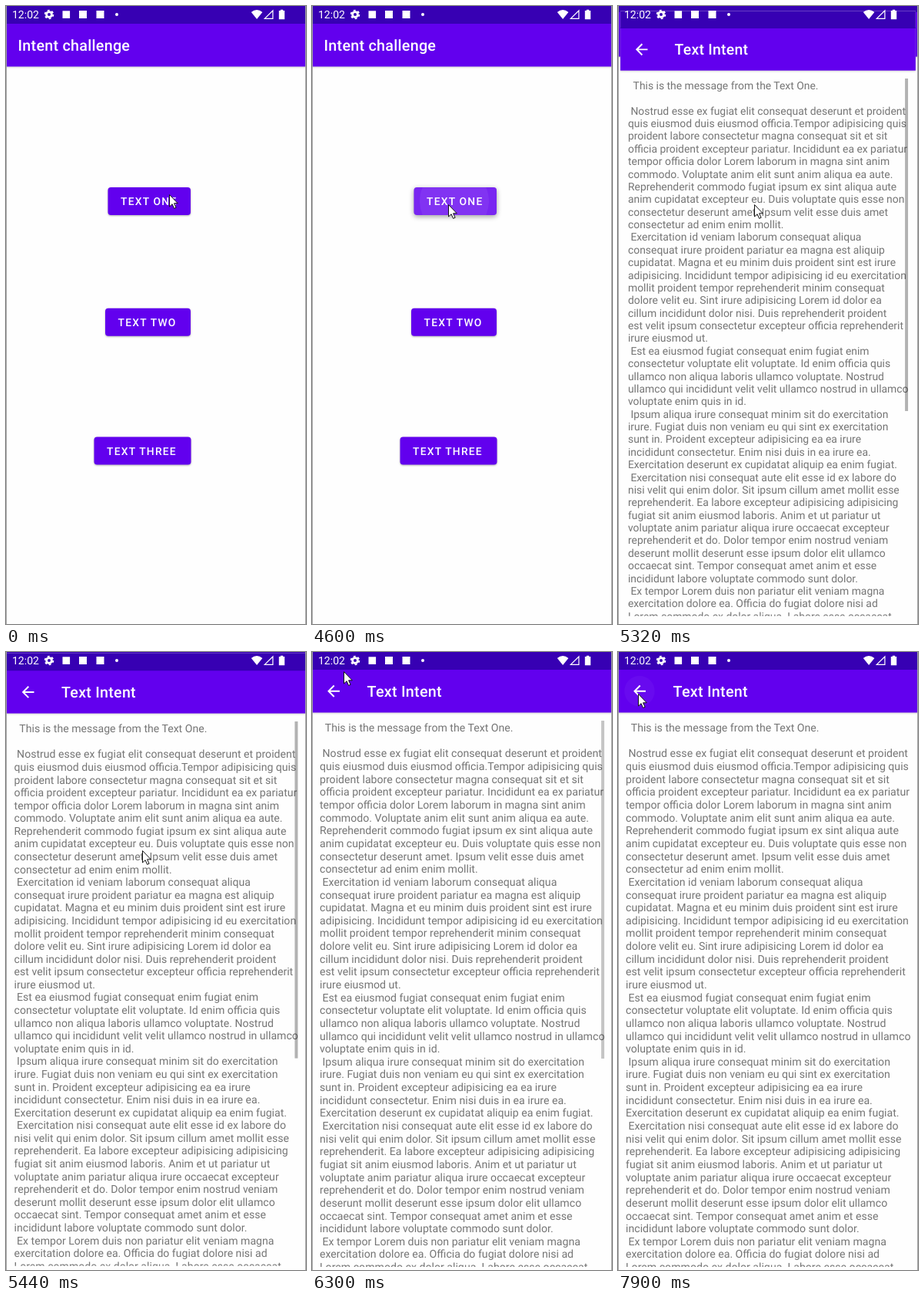
An HTML page for the animation above (8000 ms loop, 390 px wide and 801 px high).

```html
<!DOCTYPE html>
<html lang="en">
<head>
<meta charset="utf-8">
<title>Intent challenge</title>
<style>
html, body { margin: 0; width: 100%; height: 100%; overflow: hidden; background: #fefefe; }
svg { display: block; width: 390px; height: 801px; }
text { font-family: Roboto, "Noto Sans", sans-serif; white-space: pre; text-rendering: geometricPrecision; }
.title { font-size: 19.76px; font-weight: 500; letter-spacing: .25px; fill: #fff; }
.label { font-size: 13.83px; font-weight: 500; letter-spacing: 1.235px; fill: #fff; }
.body { font-size: 14.13px; fill: #757575; }
.clock { font-size: 14px; fill: #fff; }
.btn { fill: #6200ee; filter: drop-shadow(0 1px 1px rgba(0,0,0,.3)); }
.btn.down { filter: drop-shadow(0 2px 3px rgba(0,0,0,.38)); }
.bar { fill: #6200ee; filter: drop-shadow(0 1px 1px rgba(0,0,0,.18)); }
</style>
</head>
<body>
<svg viewBox="0 0 390 801">
  <defs>
    <clipPath id="btnClip"><rect x="132.5" y="235" width="107.5" height="36" rx="4"/></clipPath>
    <clipPath id="textClip"><rect x="0" y="86" width="390" height="711"/></clipPath>
  </defs>

  <g id="home">
    <rect width="390" height="801" fill="#fefefe"/>
    <rect class="bar" y="22" width="390" height="56.5"/>
    <rect width="390" height="23" fill="#3700b3"/>
    <text class="title" x="15.5" y="58">Intent challenge</text>
    <g id="buttons"></g>
  </g>

  <g id="detail">
    <rect width="390" height="801" fill="#fefefe"/>
    <rect class="bar" y="22" width="390" height="56.5"/>
    <rect width="390" height="23" fill="#3700b3"/>
    <circle id="ripple" cx="28" cy="50.7" r="19.7" fill="#fff" opacity="0"/>
    <path transform="translate(16.2 38.9) scale(.988)" fill="#fff"
      d="M20 11H7.83l5.59-5.59L12 4l-8 8 8 8 1.41-1.41L7.83 13H20z"/>
    <text class="title" x="71.6" y="58">Text Intent</text>
    <g id="lines" clip-path="url(#textClip)"></g>
    <rect id="thumb" x="376" y="89" width="4" height="438" fill-opacity=".3"/>
  </g>

  <g id="status" fill="#fff">
    <text class="clock" x="8" y="16">12:02</text>
    <circle cx="56" cy="11" r="3.4" fill="none" stroke="#fff" stroke-width="2.8"/>
    <circle cx="56" cy="11" r="5.4" fill="none" stroke="#fff" stroke-width="1.8" stroke-dasharray="2.8 2.855"/>
    <rect x="73.5" y="6.3" width="9.6" height="9.6"/>
    <rect x="95" y="6" width="10" height="10"/>
    <rect x="117.5" y="6" width="10" height="10"/>
    <circle cx="144" cy="11" r="2"/>
    <path d="M318.8 8Q326 2.2 333.4 8L326.1 17Z"/>
    <path d="M346.9 6V16.4H336.3Z" fill="none" stroke="#fff" stroke-width="1.2"/>
    <path d="M354.8 6h2V4.700h3.400V6h2v11.200h-7.400z"/>
  </g>

  <path id="cursor" d="M.5.6V16l3.600-3.300 2.500 5.700 2.500-1.100-2.500-5.500h4.700z"
    fill="#fff" stroke="#111" stroke-width="1" stroke-linejoin="round"/>
  <path d="M.5 0V801M389.5 0V801" stroke="#a2a2a2"/>
</svg>

<script>
const LOOP = 8000;
const $ = id => document.getElementById(id);

function add(parent, tag, attrs, text) {
  const el = document.createElementNS("http://www.w3.org/2000/svg", tag);
  for (const k in attrs) el.setAttribute(k, attrs[k]);
  if (text) el.textContent = text;
  return parent.appendChild(el);
}

const buttons = [
  ["TEXT ONE", 132.5, 235, 107.5],
  ["TEXT TWO", 129, 391.7, 111],
  ["TEXT THREE", 114.5, 558.6, 126],
];
let press, firstBtn;
buttons.forEach(([name, x, y, width], i) => {
  const box = add($("buttons"), "rect", { class: "btn", x, y, width, height: 36, rx: 4 });
  if (!i) {
    firstBtn = box;
    press = add($("buttons"), "g", { "clip-path": "url(#btnClip)", fill: "#fff" });
    add(press, "rect", { x, y, width, height: 36, opacity: .15 });
    add(press, "circle", { cx: 185, cy: 253, r: 45, opacity: .06 });
  }
  add($("buttons"), "text", { class: "label", x: x + 16.5, y: y + 23.3 }, name);
});

const copy = `  This is the message from the Text One.

 Nostrud esse ex fugiat elit consequat deserunt et proident
quis eiusmod duis eiusmod officia.Tempor adipisicing quis
proident labore consectetur magna consequat sit et sit
officia proident excepteur pariatur. Incididunt ea ex pariatur
tempor officia dolor Lorem laborum in magna sint anim
commodo. Voluptate anim elit sunt anim aliqua ea aute.
Reprehenderit commodo fugiat ipsum ex sint aliqua aute
anim cupidatat excepteur eu. Duis voluptate quis esse non
consectetur deserunt amet. Ipsum velit esse duis amet
consectetur ad enim enim mollit.
 Exercitation id veniam laborum consequat aliqua
consequat irure proident pariatur ea magna est aliquip
cupidatat. Magna et eu minim duis proident sint est irure
adipisicing. Incididunt tempor adipisicing id eu exercitation
mollit proident tempor reprehenderit minim consequat
dolore velit eu. Sint irure adipisicing Lorem id dolor ea
cillum incididunt dolor nisi. Duis reprehenderit proident
est velit ipsum consectetur excepteur officia reprehenderit
irure eiusmod ut.
 Est ea eiusmod fugiat consequat enim fugiat enim
consectetur voluptate elit voluptate. Id enim officia quis
ullamco non aliqua laboris ullamco voluptate. Nostrud
ullamco qui incididunt velit velit ullamco nostrud in ullamco
voluptate enim quis in id.
 Ipsum aliqua irure consequat minim sit do exercitation
irure. Fugiat duis non veniam eu qui sint ex exercitation
sunt in. Proident excepteur adipisicing ea ea irure
incididunt consectetur. Enim nisi duis in ea irure ea.
Exercitation deserunt ex cupidatat aliquip ea enim fugiat.
 Exercitation nisi consequat aute elit esse id ex labore do
nisi velit qui enim dolor. Sit ipsum cillum amet mollit esse
reprehenderit. Ea labore excepteur adipisicing adipisicing
fugiat sit anim eiusmod laboris. Anim et ut pariatur ut
voluptate anim pariatur aliqua irure occaecat excepteur
reprehenderit et do. Dolor tempor enim nostrud veniam
deserunt mollit deserunt esse ipsum dolor elit ullamco
occaecat sint. Tempor consequat amet anim et esse
incididunt labore voluptate commodo sunt dolor.
 Ex tempor Lorem duis non pariatur elit veniam magna
exercitation dolore ea. Officia do fugiat dolore nisi ad
Lorem commodo ex dolor aliqua. Labore esse occaecat`;
copy.split("\n").forEach((line, i) =>
  add($("lines"), "text", { class: "body", x: 10, y: (103.2 + i * 16.64).toFixed(2) }, line));

// Each row: start time, then the values held until the next row
const cursorSteps = [
  [0, 212, 244], [500, 205, 247], [620, 187, 256], [740, 171, 263],
  [990, 163, 260], [1110, 161, 257], [1260, 169, 257], [1380, 177, 257],
  [5810, 108, 128], [5930, 44, 19],
  [6300, 41, 25], [6420, 35, 38], [6540, 29, 50], [6660, 27, 54], [6800, 26, 54],
];
const pressSteps = [[0, 0], [4600, 1], [4960, 0]];
// home scale, detail scale, detail opacity
const openSteps = [
  [0, 1, .85, 0], [5200, 1.002, .855, 0], [5320, 1.04, .984, 1],
  [5440, 1.045, .9967, 1], [5560, 1.045, 1, 1],
];
const thumbSteps = [[0, 1], [6300, .75], [6420, .4], [6540, .1], [6660, 0]];
const rippleSteps = [[0, 0], [7300, .08], [7420, .14], [7660, .13], [7900, .04]];

function at(steps, t) {
  let row = steps[0];
  for (const s of steps) if (s[0] <= t) row = s;
  return row.slice(1);
}

const zoom = (el, s) =>
  el.setAttribute("transform", `translate(195 400.5) scale(${s}) translate(-195 -400.5)`);
const fade = (el, a) => el.setAttribute("opacity", a);

function draw(t) {
  const [x, y] = at(cursorSteps, t);
  $("cursor").setAttribute("transform", `translate(${x} ${y})`);

  const [down] = at(pressSteps, t);
  fade(press, down);
  firstBtn.classList.toggle("down", down === 1);

  const [homeScale, scale, alpha] = at(openSteps, t);
  zoom($("home"), homeScale);
  zoom($("detail"), scale);
  fade($("detail"), alpha);

  fade($("thumb"), at(thumbSteps, t)[0]);
  fade($("ripple"), at(rippleSteps, t)[0]);
}

const start = performance.now();
function tick() {
  draw((performance.now() - start) % LOOP);
  requestAnimationFrame(tick);
}
draw(0);
requestAnimationFrame(tick);
</script>
</body>
</html>
```
